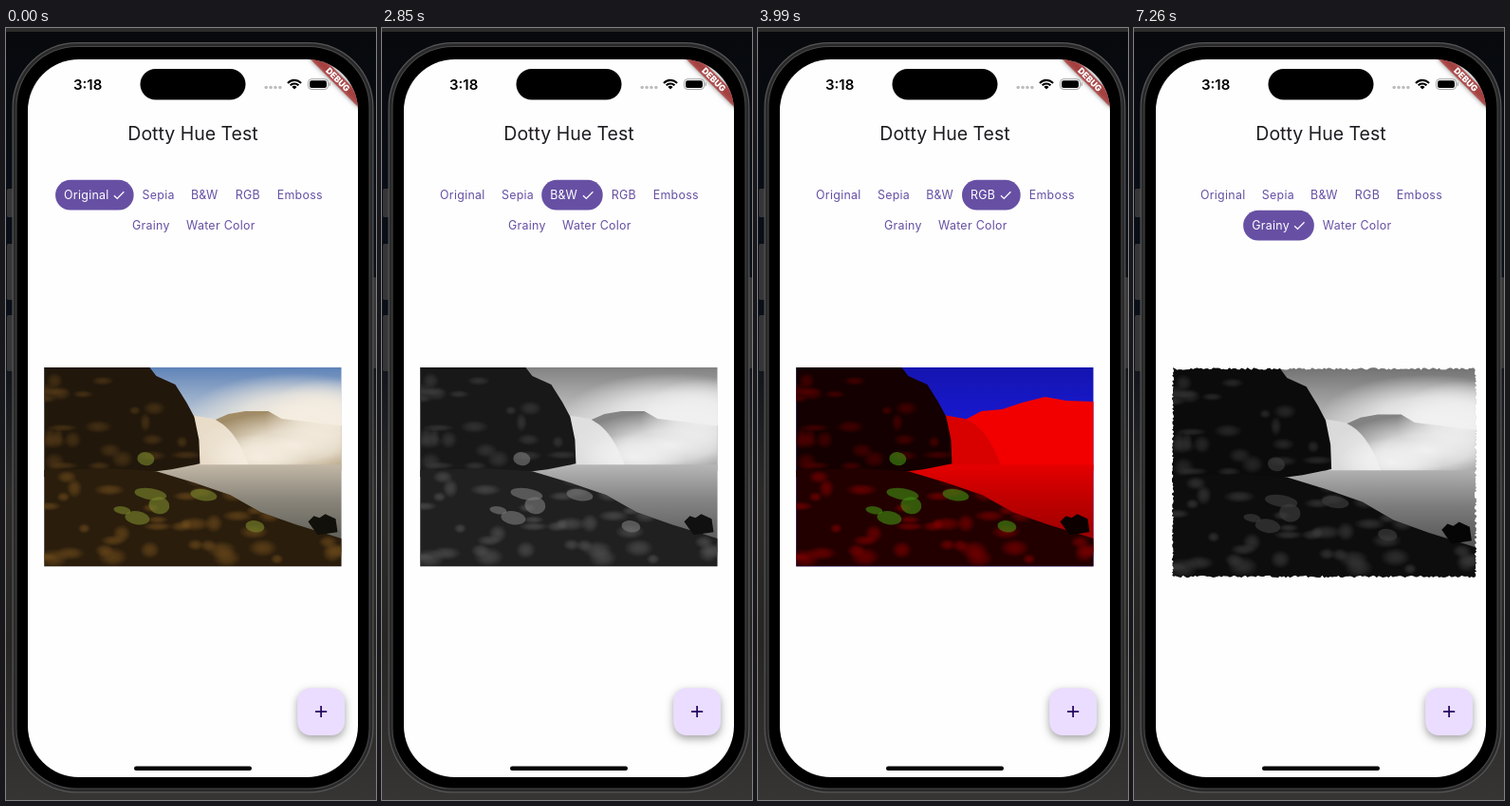
An HTML page with a canvas that plays this animation: 390 by 812 pixels, repeating every 8 s.

```html
<!DOCTYPE html>
<html lang="en">
<head>
<meta charset="utf-8">
<title>Photo filters</title>
<style>
html, body { margin: 0; width: 100%; height: 100%; overflow: hidden; background: #000; }
canvas { display: block; width: 390px; height: 812px; }
</style>
</head>
<body>
<canvas id="stage"></canvas>
<script>
const W = 390, H = 812, LOOP = 8000, MID = 197;
const canvas = document.getElementById('stage');
const ctx = canvas.getContext('2d');
const dpr = window.devicePixelRatio || 1;
canvas.width = W * dpr;
canvas.height = H * dpr;

const FONT = 'Inter, Roboto, sans-serif';
const ACCENT = '#6750a4';
const SWITCHES = [0, 1500, 2850, 3960, 5670, 7260];

// Each row holds [label, slot width]; a selected slot grows to fit its tick.
const ROWS = [
  { y: 160, chips: [['Original', 64.8], ['Sepia', 51.3], ['B&W', 46.8], ['RGB', 44], ['Emboss', 65.2]] },
  { y: 192, chips: [['Grainy', 57], ['Water Color', 89]] }
];
const TICK_ROOM = 17.7;

const LOOKS = [
  { sky: '#5f83b8', low: '#c3ced8', mist: '245,237,224', hill: '#a18c67', fall: '#e9ddca',
    lake: ['#c4b9a8', '#8b867b', '#65645d'], cliff: '#21170b', cliffLit: '84,58,23',
    ground: '#2a1d0c', groundLit: '112,76,28', plant: '#75812a', rock: '#12100b' },
  { sky: '#658dc5', low: '#cccfcb', mist: '242,233,220', hill: '#aaa18e', fall: '#e3d9c9',
    lake: ['#c0b6a7', '#8d877c', '#716c62'], cliff: '#26221d', cliffLit: '88,80,67',
    ground: '#28241e', groundLit: '104,96,82', plant: '#858b77', rock: '#141310' },
  { sky: '#828282', low: '#cccccc', mist: '240,240,240', hill: '#858585', fall: '#dfdfdf',
    lake: ['#b8b8b8', '#858585', '#626262'], cliff: '#181818', cliffLit: '62,62,62',
    ground: '#202020', groundLit: '84,84,84', plant: '#777777', rock: '#101010' },
  { sky: '#1515b0', low: '#1818d0', mist: null, hill: '#f20000', fall: '#d90000',
    lake: ['#e60000', '#c00000', '#a00000'], cliff: '#140000', cliffLit: '88,0,0',
    ground: '#230000', groundLit: '132,0,0', plant: '#3f8812', rock: '#0c0000' },
  { sky: '#638bc0', low: '#c8d2da', mist: '246,237,225', hill: '#a5957a', fall: '#e8dccb',
    lake: ['#c2b9ab', '#959187', '#7d7d75'], cliff: '#a1927c', cliffLit: '240,239,236',
    ground: '#9d8450', groundLit: '225,222,213', plant: '#a4a52a', rock: '#b7b3a8',
    box: [41, 359, 314, 212.5], rough: 1 },
  { sky: '#747474', low: '#c0c0c0', mist: '241,241,241', hill: '#828282', fall: '#dadada',
    lake: ['#b2b2b2', '#7c7c7c', '#575757'], cliff: '#0b0b0b', cliffLit: '52,52,52',
    ground: '#0d0d0d', groundLit: '62,62,62', plant: '#3d3d3d', rock: '#050505',
    box: [41, 358.5, 319, 218.5], rough: 2.4 }
];

function seeded(s) {
  return () => (s = (s * 16807) % 2147483647) / 2147483647;
}

function box(x, y, w, h, r, fill) {
  ctx.beginPath();
  ctx.roundRect(x, y, w, h, r);
  if (fill) { ctx.fillStyle = fill; ctx.fill(); }
}

function shape(points, fill) {
  ctx.beginPath();
  for (let i = 0; i < points.length; i += 2) ctx.lineTo(points[i], points[i + 1]);
  ctx.closePath();
  ctx.fillStyle = fill;
  ctx.fill();
}

function line(points, color, width) {
  ctx.beginPath();
  for (let i = 0; i < points.length; i += 2) ctx.lineTo(points[i], points[i + 1]);
  ctx.strokeStyle = color;
  ctx.lineWidth = width;
  ctx.stroke();
}

function fade(y0, y1, ...colors) {
  const g = ctx.createLinearGradient(0, y0, 0, y1);
  colors.forEach((c, i) => g.addColorStop(i / (colors.length - 1), c));
  return g;
}

function glow(x, y, rx, ry, rgb, alpha) {
  ctx.save();
  ctx.translate(x, y);
  ctx.scale(rx, ry);
  const g = ctx.createRadialGradient(0, 0, 0, 0, 0, 1);
  g.addColorStop(0, `rgba(${rgb},${alpha})`);
  g.addColorStop(0.45, `rgba(${rgb},${alpha * 0.75})`);
  g.addColorStop(1, `rgba(${rgb},0)`);
  ctx.fillStyle = g;
  ctx.fillRect(-1, -1, 2, 2);
  ctx.restore();
}

function label(text, x, y, size, color, weight = 400, spacing = 0, align = 'left') {
  ctx.font = `${weight} ${size}px ${FONT}`;
  ctx.letterSpacing = spacing + 'px';
  ctx.textAlign = align;
  ctx.fillStyle = color;
  ctx.fillText(text, x, y);
}

function screen() {
  box(23, 33, 348, 755, 54, '#fefefe');
}

function drawBackdrop() {
  ctx.fillStyle = fade(0, H, '#07090c', '#090d15', '#0b0f18', '#2b2a29', '#262524', '#363534');
  ctx.fillRect(0, 0, W, H);
  ctx.fillStyle = '#2b2c2a';
  ctx.fillRect(0, 0, W, 4);
}

function drawPhone() {
  for (const [y, h] of [[169, 30], [227, 59], [302, 59]]) box(1, y, 7, h, 1.5, '#363638');
  box(384, 262, 6, 96, 1.5, '#363638');
  box(6.5, 15, 381, 789.5, 68, '#565657');
  box(7.7, 16.2, 378.6, 787.1, 67, '#29292a');
  box(10.5, 19, 373, 781.5, 64, '#49494a');
  box(11.5, 20, 371, 779.5, 63, '#000');
  screen();
}

function drawStatus() {
  box(141.5, 43, 111, 32.5, 16.25, '#000');
  label('3:18', 71, 64.5, 15, '#000', 600);
  for (let i = 0; i < 4; i++) box(272.4 + i * 4.9, 60.8, 3.5, 3.5, 1.75, '#bdbdbd');

  ctx.strokeStyle = '#000';
  ctx.lineWidth = 2.1;
  for (const r of [6, 9.6]) {
    ctx.beginPath();
    ctx.arc(304, 64.5, r, -0.76 * Math.PI, -0.24 * Math.PI);
    ctx.stroke();
  }
  ctx.beginPath();
  ctx.moveTo(304, 64.5);
  ctx.arc(304, 64.5, 3.6, -0.76 * Math.PI, -0.24 * Math.PI);
  ctx.fillStyle = '#000';
  ctx.fill();

  box(318.5, 53.7, 21, 10.8, 3.5);
  ctx.strokeStyle = '#a5a5a5';
  ctx.lineWidth = 1;
  ctx.stroke();
  box(320, 55.2, 18, 7.8, 2.2, '#000');
  box(340.6, 57.2, 1.2, 3.8, 0.6, '#a5a5a5');
}

function drawBanner() {
  ctx.save();
  box(23, 33, 348, 755, 54);
  ctx.clip();
  ctx.translate(371, 33);
  // The caster sits off stage so that only its shadow shows.
  ctx.save();
  ctx.shadowColor = 'rgba(0,0,0,.5)';
  ctx.shadowBlur = 5 * dpr;
  ctx.shadowOffsetX = 1000 * dpr;
  ctx.translate(-1000, 0);
  ctx.rotate(Math.PI / 4);
  box(-35.4, 24.8, 70.8, 10.6, 0, '#000');
  ctx.restore();
  ctx.rotate(Math.PI / 4);
  box(-35.4, 24.8, 70.8, 10.6, 0, 'rgba(183,28,28,.63)');
  label('DEBUG', 0, 33.3, 9, '#fff', 900, 0, 'center');
  ctx.restore();
}

function drawChips(active) {
  let index = 0;
  for (const { y, chips } of ROWS) {
    const holds = active >= index && active < index + chips.length;
    const total = chips.reduce((sum, c) => sum + c[1], holds ? TICK_ROOM : 0);
    let x = MID - total / 2;
    for (const [name, slot] of chips) {
      const on = index++ === active;
      const w = slot + (on ? TICK_ROOM : 0);
      if (on) {
        box(x, y - 0.2, w, 31.8, 15.9, ACCENT);
        const tx = x + slot - 3;
        line([tx, y + 16.2, tx + 3.3, y + 19.4, tx + 10.4, y + 12.3], '#fff', 1.25);
      }
      label(name, x + 9, y + 20.4, 12.4, on ? '#fff' : ACCENT, 400, 0.3);
      x += w;
    }
  }
}

function clipPhoto([x, y, w, h], rough) {
  const rnd = seeded(41);
  const nudge = () => (rnd() - 0.5) * rough;
  const n = 150;
  ctx.beginPath();
  for (let i = 0; i < n; i++) ctx.lineTo(x + w * i / n, y + nudge());
  for (let i = 0; i < n; i++) ctx.lineTo(x + w + nudge(), y + h * i / n);
  for (let i = n; i > 0; i--) ctx.lineTo(x + w * i / n, y + h + nudge());
  for (let i = n; i > 0; i--) ctx.lineTo(x + nudge(), y + h * i / n);
  ctx.closePath();
  ctx.clip();
}

function patches(seed, count, x, y, w, h, rgb) {
  const rnd = seeded(seed);
  for (let i = 0; i < count; i++) {
    glow(x + rnd() * w, y + rnd() * h, 6 + rnd() * 12, 4 + rnd() * 7, rgb, 0.65);
  }
}

function drawPhoto(look) {
  const area = look.box || [40.3, 357, 313.2, 209.3];
  ctx.save();
  clipPhoto(area, look.rough || 0);
  ctx.translate(area[0], area[1]);
  ctx.scale(area[2] / 313, area[3] / 209);

  ctx.fillStyle = fade(0, 55, look.sky, look.low);
  ctx.fillRect(-3, -3, 320, 215);
  if (look.mist) glow(265, 48, 112, 42, look.mist, 1);
  const far = look.mist
    ? [155, 50, 178, 56, 194, 49, 212, 46, 236, 46, 250, 54, 318, 62, 318, 108, 155, 108]
    : [155, 50, 178, 55, 195, 46, 217, 44, 238, 37, 262, 31, 285, 35, 318, 36, 318, 108, 155, 108];
  shape(far, look.hill);
  ctx.beginPath();
  ctx.moveTo(154, 50);
  ctx.lineTo(178, 54);
  ctx.bezierCurveTo(196, 62, 206, 78, 216, 104);
  ctx.lineTo(160, 104);
  ctx.fillStyle = look.fall;
  ctx.fill();
  if (look.mist) {
    glow(262, 82, 100, 36, look.mist, 1);
    glow(225, 94, 55, 24, look.mist, 1);
    glow(298, 54, 66, 42, look.mist, 1);
  }

  shape([95, 108, 160, 102, 318, 102, 318, 195, 95, 160], fade(101, 175, ...look.lake));

  ctx.save();
  shape([-4, -4, 108, -4, 118, 9, 138, 18, 150, 37, 158, 52, 163, 76, 164, 101, 134, 107, 70, 115, -4, 115], look.cliff);
  ctx.clip();
  patches(17, 26, 0, 0, 150, 108, look.cliffLit);
  ctx.restore();

  ctx.save();
  shape([-4, 108, 70, 106, 118, 109, 158, 121, 196, 134, 228, 152, 265, 165, 318, 181, 318, 214, -4, 214], look.ground);
  ctx.clip();
  patches(83, 44, 0, 112, 313, 95, look.groundLit);
  ctx.restore();

  const plants = [[107, 96, 9, 7], [112, 133, 17, 6], [121, 145, 11, 9], [98, 158, 13, 7],
    [82, 150, 9, 4], [168, 134, 14, 6], [222, 167, 10, 6]];
  ctx.fillStyle = look.plant;
  ctx.globalAlpha = 0.65;
  for (const [x, y, rx, ry] of plants) {
    ctx.beginPath();
    ctx.ellipse(x, y, rx, ry, 0.15, 0, 7);
    ctx.fill();
  }
  ctx.globalAlpha = 1;
  shape([278, 162, 284, 156, 290, 158, 296, 154, 307, 159, 309, 173, 288, 176], look.rock);
  ctx.restore();
}

function drawButton() {
  ctx.save();
  ctx.shadowColor = 'rgba(0,0,0,.36)';
  ctx.shadowBlur = 8 * dpr;
  ctx.shadowOffsetY = 3.5 * dpr;
  box(307.2, 694.2, 49.8, 49.8, 14, '#eaddff');
  ctx.restore();
  line([326, 719, 338.2, 719], '#21005d', 1.7);
  line([332.1, 712.9, 332.1, 725.1], '#21005d', 1.7);
}

function draw(time) {
  const active = SWITCHES.filter(s => s <= time).length - 1;
  ctx.setTransform(dpr, 0, 0, dpr, 0, 0);
  drawBackdrop();
  drawPhone();
  drawStatus();
  label('Dotty Hue Test', MID, 117.8, 19.5, '#1d1b20', 400, 0, 'center');
  drawChips(active);
  drawPhoto(LOOKS[active]);
  drawButton();
  drawBanner();
  box(135, 776.5, 124, 4.4, 2.2, '#000');
}

const start = performance.now();
function tick() {
  draw((performance.now() - start) % LOOP);
  requestAnimationFrame(tick);
}
tick();
</script>
</body>
</html>
```
